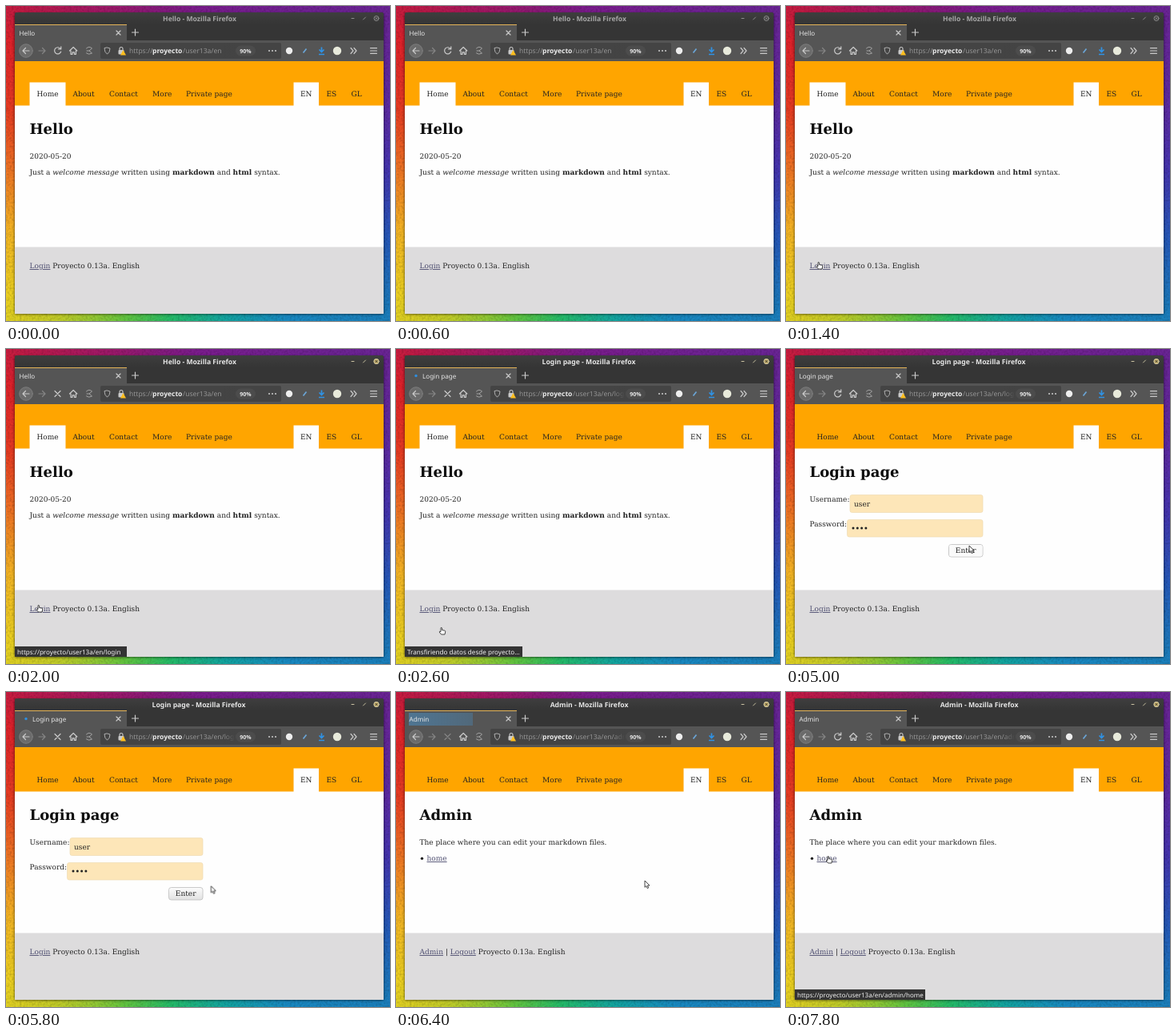
An HTML page that plays this animation: 480 px wide and 394 px high, repeating every 8 s.

```html
<!DOCTYPE html>
<html lang="en">
<head>
<meta charset="utf-8">
<title>Browser login demo</title>
<style>
html, body { margin: 0; width: 100%; height: 100%; overflow: hidden; }
body {
  background: conic-gradient(at 50% 50%,
    #7a1c8c 0deg, #6a2494 50deg, #5a2aa4 75deg, #4434b0 92deg, #2458b8 112deg,
    #1a80bc 130deg, #1888c0 150deg, #12a4a0 170deg, #24ba68 190deg, #60c440 205deg,
    #c0cc28 222deg, #ead020 234deg, #f2b424 250deg, #ee7424 268deg,
    #e63c22 286deg, #de222a 303deg, #bc1a48 312deg, #a41862 325deg, #861a7c 345deg, #7a1c8c 360deg);
}
svg { display: block; position: absolute; inset: 0; width: 100%; height: 100%; }
text { white-space: pre; text-rendering: geometricPrecision; }
.ui { font-family: "Noto Sans", "Open Sans", sans-serif; font-size: 8.1px; fill: #e6e6e6; }
.page { font-family: "DejaVu Serif", "Noto Serif", serif; font-size: 9.03px; fill: #222; }
.page .h1 { font-size: 18.06px; font-weight: bold; fill: #0c0c0c; }
.link { fill: #4e4e70; text-decoration: underline; }
.title { font-size: 8.6px; font-weight: bold; text-anchor: middle; }
.url { font-size: 8.5px; fill: #949494; }
.url .host { fill: #ececec; font-weight: 600; }
.status { font-weight: 500; fill: #f4f4f4; }
.icon { fill: none; stroke: #cacaca; stroke-width: 1.2; stroke-linecap: round; stroke-linejoin: round; }

/* Switched parts: a 0/1 opacity timeline each */
.sw { opacity: 0; animation: 8s step-end -40ms infinite; }
.home { animation-name: home; }
.login { animation-name: login; }
.admin { animation-name: admin; }
.t-home { animation-name: t-home; }
.t-login { animation-name: t-login; }
.blur { animation-name: blur; }
.focus { animation-name: focus; }
.loading { animation-name: loading; }
.settle { animation-name: settle; }
.idle { animation-name: idle; }
.s-login { animation-name: s-login; }
.s-load { animation-name: s-load; }
.s-home { animation-name: s-home; }
.hover { animation-name: hover; }
.hand { animation-name: hand; }
.arrow { animation-name: arrow; }
@keyframes home { 0% { opacity: 1 } 35%, 100% { opacity: 0 } }
@keyframes login { 0% { opacity: 0 } 35% { opacity: 1 } 77.5%, 100% { opacity: 0 } }
@keyframes admin { 0% { opacity: 0 } 77.5%, 100% { opacity: 1 } }
@keyframes t-home { 0% { opacity: 1 } 30%, 100% { opacity: 0 } }
@keyframes t-login { 0% { opacity: 0 } 30% { opacity: 1 } 77.5%, 100% { opacity: 0 } }
@keyframes blur { 0% { opacity: 1 } 25%, 100% { opacity: 0 } }
@keyframes focus { 0% { opacity: 0 } 25%, 100% { opacity: 1 } }
@keyframes loading { 0%, 35%, 77.5%, 100% { opacity: 0 } 25%, 67.5% { opacity: 1 } }
@keyframes settle { 0%, 37.5%, 82.5%, 100% { opacity: 0 } 35%, 77.5% { opacity: 1 } }
@keyframes idle { 0%, 37.5%, 82.5%, 100% { opacity: 1 } 25%, 67.5% { opacity: 0 } }
@keyframes s-login { 0%, 27.5%, 100% { opacity: 0 } 20% { opacity: 1 } }
@keyframes s-load { 0%, 35%, 100% { opacity: 0 } 30% { opacity: 1 } }
@keyframes s-home { 0% { opacity: 0 } 95%, 100% { opacity: 1 } }
@keyframes hover { 0%, 72.5%, 100% { opacity: 0 } 57.5% { opacity: 1 } }
@keyframes hand { 0%, 35% { opacity: 0 } 17.5%, 92.5%, 100% { opacity: 1 } }
@keyframes arrow { 0%, 35% { opacity: 1 } 17.5%, 92.5%, 100% { opacity: 0 } }

.cursor { animation: move 8s -40ms infinite; }
@keyframes move {
  0% { transform: translate(150px, 400px); animation-timing-function: step-end }
  7.5% { transform: translate(150px, 400px); animation-timing-function: steps(4) }
  17.5% { transform: translate(41px, 320px); animation-timing-function: step-end }
  27.5% { transform: translate(41px, 320px); animation-timing-function: steps(2) }
  32.5% { transform: translate(57px, 348px); animation-timing-function: steps(3) }
  40% { transform: translate(86px, 350px); animation-timing-function: step-end }
  47.5% { transform: translate(86px, 350px); animation-timing-function: steps(4) }
  57.5% { transform: translate(229px, 246px); animation-timing-function: step-end }
  70% { transform: translate(229px, 246px); animation-timing-function: steps(3) }
  77.5% { transform: translate(311px, 236px); animation-timing-function: step-end }
  82.5% { transform: translate(311px, 236px); animation-timing-function: steps(4) }
  92.5%, 100% { transform: translate(53px, 205px); animation-timing-function: step-end }
}
</style>
</head>
<body>
<svg viewBox="0 0 480 394">
  <defs>
    <filter id="paint" x="0" y="0" width="100%" height="100%">
      <feTurbulence type="fractalNoise" baseFrequency=".4" numOctaves="2" seed="4"/>
      <feColorMatrix values="0 0 0 0 0  0 0 0 0 0  0 0 0 0 0  1.4 0 0 0 -.55"/>
    </filter>
    <filter id="shadow" x="-10%" y="-10%" width="120%" height="120%"><feGaussianBlur stdDeviation="1.6"/></filter>
    <linearGradient id="bar" x2="0" y2="1"><stop stop-color="#3e3e3e"/><stop offset="1" stop-color="#353535"/></linearGradient>
    <linearGradient id="button" x2="0" y2="1"><stop stop-color="#fcfcfc"/><stop offset="1" stop-color="#e2e2e2"/></linearGradient>
    <linearGradient id="fade"><stop offset=".5" stop-color="#444" stop-opacity="0"/><stop offset="1" stop-color="#444"/></linearGradient>
    <linearGradient id="burst"><stop stop-color="#4c87b4" stop-opacity=".65"/><stop offset="1" stop-color="#4c87b4" stop-opacity=".4"/></linearGradient>
    <clipPath id="field"><rect x="150" y="46" width="136" height="20"/></clipPath>
  </defs>

  <rect width="480" height="394" filter="url(#paint)" opacity=".25"/>
  <rect x="10.5" y="9" width="462" height="377" rx="3" opacity=".5" filter="url(#shadow)"/>

  <!-- Window frame -->
  <path d="M11 385V11q0-3 3-3H469q3 0 3 3V385z" fill="#353535"/>
  <path d="M11 23V11q0-3 3-3H469q3 0 3 3V23z" fill="url(#bar)"/>
  <rect x="11" y="23" width="140" height="20" fill="#555"/>
  <rect x="11" y="23" width="140" height="1" fill="#e5b458"/>
  <rect x="11" y="43" width="461" height="26" fill="#555"/>
  <rect x="118" y="46" width="226" height="20" rx="2" fill="#444"/>

  <g class="ui">
    <rect class="sw settle" x="16" y="26" width="80" height="16" fill="url(#burst)"/>
    <g class="sw blur">
      <text class="title" x="242" y="19" style="fill:#a6a6a6">Hello - Mozilla Firefox</text>
      <g class="icon" style="stroke:#8c8c8c;stroke-width:1"><path d="M432 15.5h3M446.5 17l3-3"/><circle cx="463" cy="15.5" r="3"/><path d="M462 14.5l2 2m0-2l-2 2"/></g>
    </g>
    <g class="sw focus">
      <text class="title sw t-home" x="242" y="19">Hello - Mozilla Firefox</text>
      <text class="title sw t-login" x="241" y="19">Login page - Mozilla Firefox</text>
      <text class="title sw admin" x="241.5" y="19">Admin - Mozilla Firefox</text>
      <g class="icon" style="stroke:#c8c0a0;stroke-width:1"><path d="M432 15.5h3M446.5 17l3-3"/><circle cx="463" cy="15.5" r="3.2" fill="#c9b26a"/><path stroke="#333" d="M462 14.5l2 2m0-2l-2 2"/></g>
    </g>
    <text class="sw t-home" x="16.5" y="36.5">Hello</text>
    <g class="sw t-login">
      <text class="sw idle" x="16.5" y="36.5">Login page</text>
      <text class="sw settle" x="16.5" y="36.5">Login page</text>
      <g class="sw loading"><circle cx="25" cy="33.5" r="1.7" fill="#2e8fe0"/><text x="33" y="36.5">Login page</text></g>
    </g>
    <text class="sw admin" x="16.5" y="36.5">Admin</text>

    <g class="icon">
      <path d="M138 31l5 5m0-5l-5 5M157.500 33h8m-4-4v8"/>
      <circle cx="25" cy="56" r="8.3" fill="#6b6b6b" stroke="#858585" stroke-width=".8"/>
      <path d="M29 56h-8m3.5-3.5L21 56l3.5 3.5"/>
      <path d="M41 56h8m-3.5-3.5L49 56l-3.5 3.5" stroke="#858585"/>
      <g class="sw idle"><path d="M68 53.3a4.1 4.1 0 1 0 .7 3.7M68.8 50.8v3.1h-3.2"/></g>
      <g class="sw loading"><path d="M61 52.5l7 7m0-7l-7 7"/></g>
      <g class="sw settle"><path d="M61 52.5l7 7m0-7l-7 7" stroke="#858585"/></g>
      <path d="M79.5 56l4.7-4.5 4.7 4.5M81 56v4.3h2v-2.5h2.4v2.5h2V56"/>
      <path d="M100.500 53q3.500-3.500 7 0l-3.500 3 3.500 3q-4 2.500-7 0M101 56h3" stroke="#a5a5a5" stroke-width="1"/>
      <path d="M126.5 52l3.500 1q0 5-3.500 7.200-3.500-2.200-3.500-7.200z" stroke="#b0b0b0" stroke-width="1"/>
      <path d="M142 55v-1.5a2 2 0 0 1 4 0V55" stroke-width="1.1"/>
      <path d="M431 52.5l3 3.5-3 3.5m4-7l3 3.5-3 3.5M455.5 52.7h8m-8 3.3h8m-8 3.3h8"/>
    </g>
    <rect x="140.5" y="55" width="7" height="5.5" rx="1" fill="#cacaca"/>
    <path d="M146.5 55l3.5 6.5h-7z" fill="#ffbf1f"/>

    <g clip-path="url(#field)" class="url">
      <text x="154" y="59">https://<tspan class="host" x="183">proyecto</tspan><tspan x="221">/user13a/en</tspan></text>
      <text class="sw t-login" x="269.5" y="59">/login</text>
      <text class="sw admin" x="269.5" y="59">/admin</text>
    </g>
    <rect x="258" y="47" width="28" height="18" fill="url(#fade)"/>
    <rect x="287" y="49.5" width="25" height="13" rx="6.5" fill="#4c4c4c"/>
    <text x="299.5" y="58.7" text-anchor="middle" style="font-size:7px;font-weight:600">90%</text>
    <g fill="#c4c4c4"><circle cx="329" cy="56" r="1.1"/><circle cx="333" cy="56" r="1.1"/><circle cx="337" cy="56" r="1.1"/></g>
    <circle cx="354" cy="56" r="4.2" fill="#eee"/>
    <path d="M371.500 58.500l4-5" stroke="#6ba6d8" stroke-width="1.7"/>
    <path d="M394.500 51.500v6m-3-3l3 3 3-3M391 60.500h7" fill="none" stroke="#2f93e6" stroke-width="1.7"/>
    <circle cx="414" cy="56" r="5.2" fill="#e8eadb"/>
  </g>

  <!-- Web page -->
  <rect x="11" y="69" width="461" height="56" fill="#ffa500"/>
  <rect x="11" y="124.500" width="461" height="178" fill="#fefefe"/>
  <rect x="11" y="301.500" width="461" height="83.500" fill="#dddcdd"/>
  <g class="page">
    <rect class="sw home" x="29.500" y="95.500" width="45" height="30" fill="#fefefe"/>
    <rect x="359.500" y="95.500" width="31.500" height="30" fill="#fefefe"/>
    <text y="112.800"><tspan x="38.500">Home</tspan><tspan x="83.500">About</tspan><tspan x="129">Contact</tspan><tspan x="183">More</tspan><tspan x="225">Private page</tspan><tspan x="368">EN</tspan><tspan x="400.500">ES</tspan><tspan x="431.500">GL</tspan></text>

    <g class="sw home">
      <text class="h1" x="29.5" y="160.4">Hello</text>
      <text x="29.5" y="191">2020-05-20</text>
      <text x="29.5" y="211">Just a <tspan font-style="italic">welcome message</tspan> written using <tspan font-weight="bold">markdown</tspan> and <tspan font-weight="bold">html</tspan> syntax.</text>
      <text x="29.5" y="328"><tspan class="link">Login</tspan> Proyecto 0.13a. English</text>
    </g>

    <g class="sw login">
      <text class="h1" x="29.5" y="160.4">Login page</text>
      <text x="29.5" y="191">Username:</text>
      <text x="29.5" y="222">Password:</text>
      <g fill="#fde6b8" stroke="#efdcb4" stroke-width=".7"><rect x="80" y="182.5" width="166" height="22" rx="2.5"/><rect x="76.5" y="213.5" width="169.5" height="21.5" rx="2.5"/></g>
      <text x="85" y="196.5">user</text>
      <g><circle cx="84" cy="224" r="1.5"/><circle cx="89.3" cy="224" r="1.5"/><circle cx="94.6" cy="224" r="1.5"/><circle cx="99.9" cy="224" r="1.5"/></g>
      <rect x="203.5" y="244.5" width="42.5" height="15.5" rx="3" fill="url(#button)" stroke="#bdbdbd" stroke-width=".8"/>
      <rect class="sw hover" x="204" y="245" width="41.5" height="14.5" rx="2.5" fill="#fafafa"/>
      <text x="224.7" y="255.3" text-anchor="middle">Enter</text>
      <text x="29.5" y="328"><tspan class="link">Login</tspan> Proyecto 0.13a. English</text>
    </g>

    <g class="sw admin">
      <text class="h1" x="29.5" y="160.4">Admin</text>
      <text x="29.5" y="191">The place where you can edit your markdown files.</text>
      <circle cx="32.5" cy="208.3" r="1.7"/>
      <text class="link" x="38.5" y="211">home</text>
      <text x="29.5" y="328"><tspan class="link">Admin</tspan> | <tspan class="link">Logout</tspan> Proyecto 0.13a. English</text>
    </g>
  </g>

  <!-- Status bubbles -->
  <g class="ui">
    <g class="sw s-login"><rect x="11" y="372" width="140" height="13" fill="#333"/><text class="status" x="14" y="381.5">https://proyecto/user13a/en/login</text></g>
    <g class="sw s-load"><rect x="11" y="372" width="147" height="13" fill="#333"/><text class="status" x="14" y="381.5">Transfiriendo datos desde proyecto…</text></g>
    <g class="sw s-home"><rect x="11" y="372" width="163" height="13" fill="#333"/><text class="status" x="14" y="381.5" style="font-size:8px">https://proyecto/user13a/en/admin/home</text></g>
  </g>

  <g class="cursor" fill="#fff" stroke="#333" stroke-width=".9" stroke-linejoin="round">
    <path class="sw arrow" d="M0 0v8.3l1.9-1.7 1.3 3 1.5-.7-1.3-2.9h2.6z"/>
    <path class="sw hand" d="M-1 .8q.9-1.1 1.6.3v2.5l3.3.6q1 .3.8 1.5l-.7 3.300H-.4L-2.900 6q0-1.300 1.900-.4z"/>
  </g>
</svg>
</body>
</html>
```
